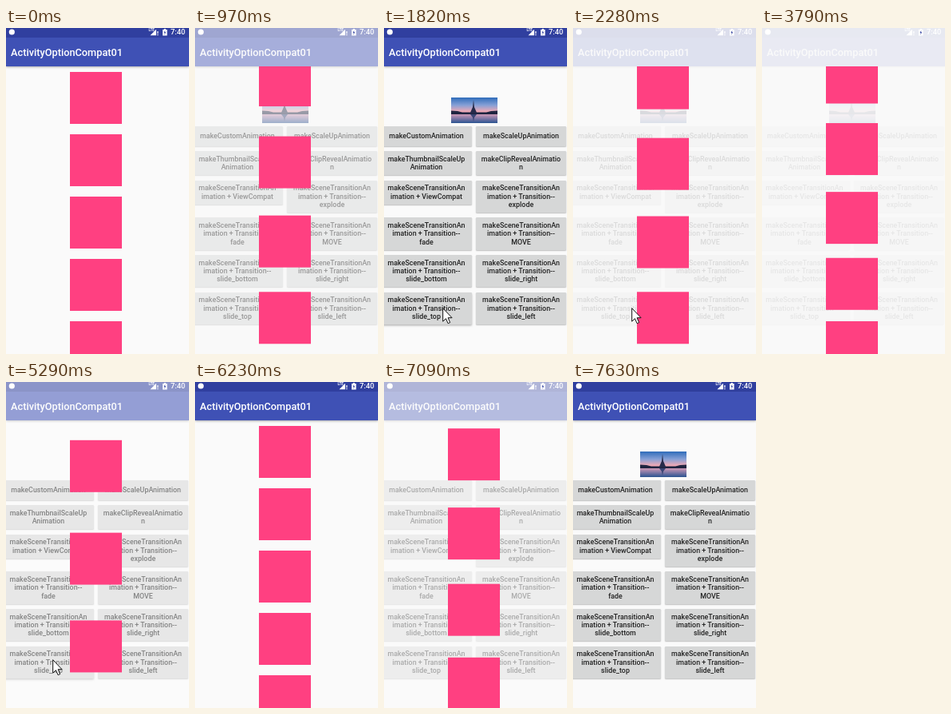
An HTML page for the animation above (7750 ms loop, 229 by 408 pixels).

```html
<!DOCTYPE html>
<html lang="en">
<head>
<meta charset="utf-8">
<title>Slide transition</title>
<style>
  html, body { margin: 0; width: 100%; height: 100%; overflow: hidden; background: #fafafa; }
  #stage { position: absolute; left: 0; top: 0; width: 229px; height: 408px; overflow: hidden;
    background: #fafafa; font: 500 8.9px/10.4px Roboto, sans-serif; color: #222; }
  #stage div, #stage svg { position: absolute; }
  .fill { inset: 0; }
  .status { left: 0; top: 0; width: 229px; height: 12px; background: #303f9f; }
  .bar { left: 0; top: 12px; width: 229px; height: 36px; box-sizing: border-box; padding-left: 6px;
    background: #3f51b5; color: #fff; font-size: 12.75px; line-height: 38px; white-space: nowrap;
    box-shadow: 0 1px 2.5px rgba(0, 0, 0, .32); }
  #buttons { left: -4px; top: 123px; display: grid; grid-template-columns: 114px 113px;
    gap: 6.3px 5px; align-items: start; }
  #stage .button { position: relative; display: flex; align-items: center; justify-content: center;
    box-sizing: border-box; min-height: 25px; padding: 4.6px 0; text-align: center; white-space: pre;
    background: #d6d7d7; border-radius: 1.3px; box-shadow: 0 1px 1.5px rgba(0, 0, 0, .24); }
  #stage .pressed { box-shadow: 0 1.5px 2.5px rgba(0, 0, 0, .28); }
  #cover { background: #fafafa; }
  .clip { left: 0; width: 229px; overflow: hidden; }
  .square { left: 80px; width: 65px; height: 65px; background: #ff4081; }
  #clock { left: 206px; top: 0; color: #fff; font-size: 9.2px; line-height: 10px; }
</style>
</head>
<body>
<div id="stage">
  <div class="fill">
    <div class="status"></div>
    <div class="bar">ActivityOptionCompat01</div>
    <svg style="left:84px;top:87px" width="58" height="32" viewBox="0 0 58 32">
      <defs>
        <linearGradient id="sky" x2="0" y2="1">
          <stop offset="0" stop-color="#2f6cba"/>
          <stop offset=".3" stop-color="#86a0d6"/>
          <stop offset=".55" stop-color="#f0a9b4"/>
          <stop offset=".68" stop-color="#c394b4"/>
          <stop offset="1" stop-color="#2a5391"/>
        </linearGradient>
      </defs>
      <rect width="58" height="32" fill="url(#sky)"/>
      <path d="M0 16.5L8 17L14 18.5H44L50 17L58 16.5V21H0Z" fill="#1f2440"/>
      <path d="M28 3L29 12L32.5 20H23.5L27 12Z" fill="#262a4a"/>
      <path d="M24 21H32L29 25L28 30L27 25Z" fill="#3b4676"/>
    </svg>
    <div id="buttons"></div>
  </div>
  <div id="cover" class="fill"></div>
  <div id="content" class="clip" style="top:48px;height:360px"></div>
  <div class="clip" style="top:0;height:12px"><div id="topStatus" class="status"></div></div>
  <div class="clip" style="top:12px;height:42px">
    <div id="topBar" class="bar" style="top:0">ActivityOptionCompat01</div>
  </div>
  <svg width="229" height="12" fill="#fff">
    <circle cx="7.3" cy="5" r="3.6"/>
    <text x="178.5" y="4" font-size="4.5" font-weight="700" font-family="Roboto, sans-serif">LTE</text>
    <path d="M180.5 9.2L188 1.8V9.2Z"/>
    <path d="M189.3 4H190.5V7.3H189.3ZM189.3 8.1H190.5V9.3H189.3Z"/>
    <path d="M196 2H197.8V1H199.8V2H201.6V9.5H196Z"/>
    <path d="M199.3 3L197.5 6H198.7L198.3 8.4L200.2 5.3H199Z" fill="#303f9f"/>
  </svg>
  <div id="clock">7:40</div>
  <svg id="cursor" width="14" height="22" viewBox="-.7 -.7 14 22">
    <path d="M0 0V16.5L3.8 13L6.4 19L9 17.9L6.4 12H11.4Z" fill="#fff" stroke="#111" stroke-width="1"/>
  </svg>
</div>
<script>
const LOOP = 7750, STEP = 135, TRAVEL = 408;
const $ = id => document.getElementById(id);
const clamp = v => Math.min(1, Math.max(0, v));
const mix = (a, b, u) => a + (b - a) * u;

function add(parent, cls, text = '') {
  const el = document.createElement('div');
  el.className = cls;
  el.textContent = text;
  return parent.appendChild(el);
}

const scene = name => `makeSceneTransitionAn\nimation + ${name}`;
const move = name => scene(`Transition--\n${name}`);
const buttons = [
  'makeCustomAnimation', 'makeScaleUpAnimation',
  'makeThumbnailScaleUp\nAnimation', 'makeClipRevealAnimatio\nn',
  scene('ViewCompat'),
  ...['explode', 'fade', 'MOVE', 'slide_bottom', 'slide_right', 'slide_top', 'slide_left'].map(move)
].map(label => add($('buttons'), 'button', label));
const slideTop = buttons.at(-2);

const squares = Array.from({ length: 5 }, (_, i) => {
  const el = add($('content'), 'square');
  el.style.top = 7 + 78 * i + 'px';
  return el;
});

// Times inside a phase count from its first refresh.
const leave = (from, start) =>
  ({ out: true, from, start, span: 300, lag: .065, fade: start - 26, fadeSpan: 260 });
const enter = (from, start, span, lag, fade, fadeSpan) =>
  ({ from, start, span, lag, fade, fadeSpan });
const phases = [
  leave(810, 45),
  enter(2130, -75, 300, .062, -53, 220),
  leave(3790, 3),
  enter(5150, -101, 400, .086, 0, 300),
  leave(6940, 65)
];

// The pointer glides in, rests on the button, presses it and glides out.
const visits = [
  { show: 1200, rest: 1530, press: 1750, go: 2270, gone: 2535, hide: 2650, path: [[106, 353], [73, 350], [117, 344]] },
  { show: 4190, rest: 4740, press: 4735, go: 5555, gone: 6095, hide: 6200, path: [[204, 345], [58, 347], [217, 343]] }
];

// Views nearer the top (higher rank) leave first and arrive last.
function lift(phase, time, rank) {
  const lead = rank * phase.lag * (phase.out ? 1 : -1);
  const p = clamp((time - phase.start) / phase.span + lead);
  return -TRAVEL * (phase.out ? p : 1 - p) ** 2;
}

function drawPointer(t) {
  const v = visits.find(v => t >= v.show && t < v.hide);
  $('cursor').style.visibility = v ? 'visible' : 'hidden';
  slideTop.classList.toggle('pressed', !!v && t >= v.press && t < v.go);
  if (!v) return;
  const [a, b, c] = v.path;
  const arrive = 1 - (1 - clamp((t - v.show) / (v.rest - v.show))) ** 3;
  const depart = clamp((t - v.go) / (v.gone - v.go));
  const [x, y] = [0, 1].map(k => mix(mix(a[k], b[k], arrive), c[k], depart));
  $('cursor').style.transform = `translate(${Math.round(x)}px, ${Math.round(y)}px)`;
}

function draw() {
  const now = performance.now() % LOOP;
  const phase = phases.findLast(p => p.from <= now) || phases[0];
  const time = Math.floor((now - phase.from) / STEP) * STEP;
  const shift = (el, rank) => el.style.transform = `translateY(${lift(phase, time, rank)}px)`;
  squares.forEach((el, i) => shift(el, 4 - i));
  shift($('topStatus'), 3);
  shift($('topBar'), 5.6);

  const f = clamp((time - phase.fade) / phase.fadeSpan);
  $('cover').style.opacity = phase.out ? 1 - f : f;
  drawPointer(phase.from + time);
  requestAnimationFrame(draw);
}
draw();
</script>
</body>
</html>
```
